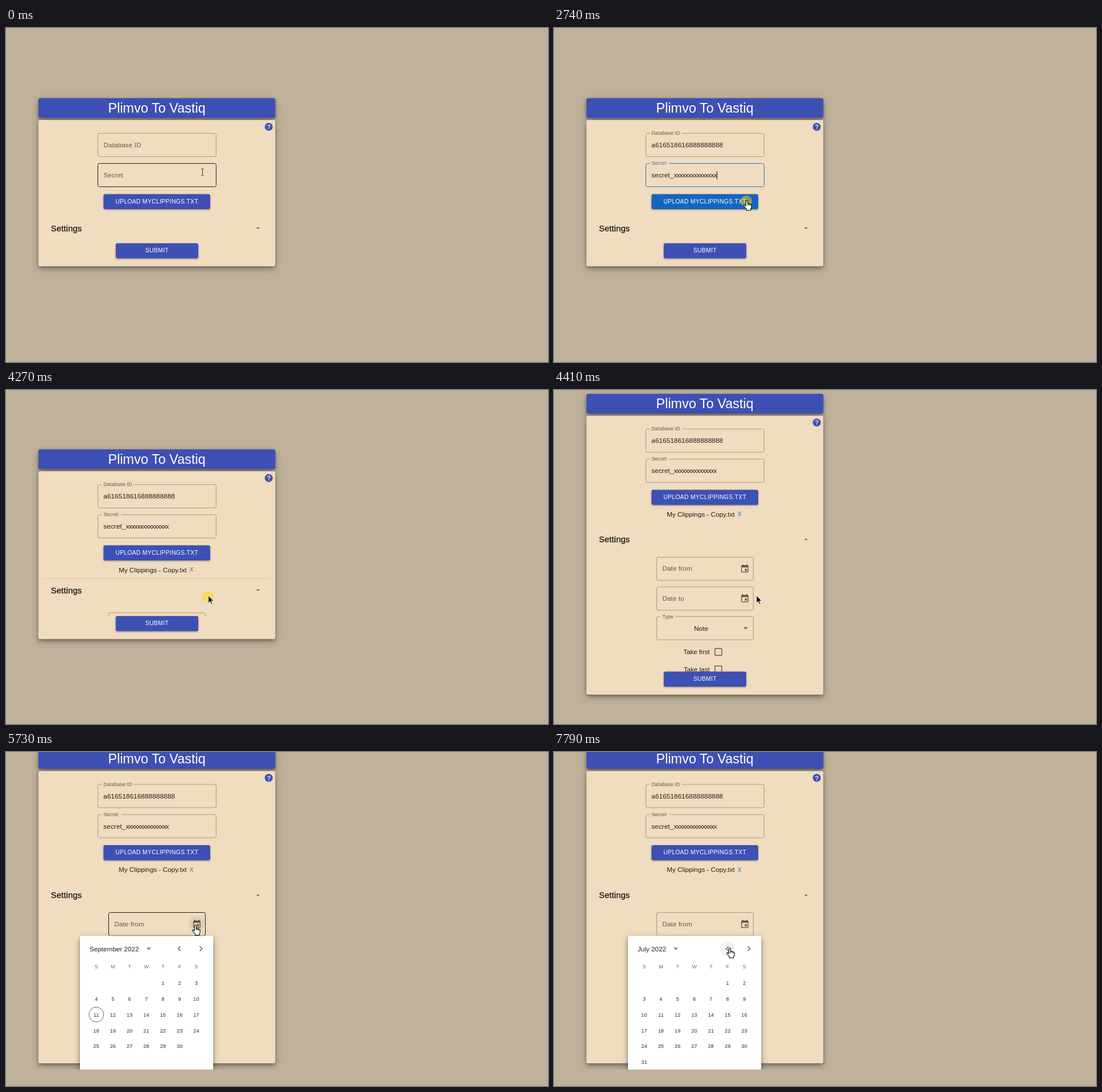
An HTML page for the animation above (8 s loop, 953 by 588 pixels).

```html
<!DOCTYPE html>
<html lang="en">
<head>
<meta charset="utf-8">
<title>Clippings form</title>
<style>
html, body { margin: 0; width: 100%; height: 100%; overflow: hidden; background: #c0b19b; }
svg { display: block; width: 953px; height: 588px; font-family: "Liberation Sans", Arial, sans-serif; }
.paper { filter: drop-shadow(0 2px 2px rgba(0,0,0,.24)) drop-shadow(0 4px 6px rgba(0,0,0,.32)); }
.btn { filter: drop-shadow(0 1px 1.5px rgba(0,0,0,.4)); }
</style>
</head>
<body>
<svg id="stage" viewBox="0 0 953 588"></svg>
<script>
const LOOP = 8000;
const BLUE = '#3e50b4', FOCUS = '#1976d2', HOVER = '#1565c0';
const INK = 'rgba(0,0,0,.87)', GREY = 'rgba(0,0,0,.6)', ICON = 'rgba(0,0,0,.56)', LINE = 'rgba(0,0,0,.3)';
const BASE = 11.73, SMALL = 8.8;

// Moments of the story
const FOCUS_ID = 580, PASTE_ID = 1050, FOCUS_SECRET = 1790, PASTE_SECRET = 2060;
const FILE_AT = 2950, EXPAND = 4222, POPUP = 5300, MONTH_CLICKS = [6950, 7420];
const CLICKS = [FOCUS_ID, FOCUS_SECRET, 2680, 4160, 5220, ...MONTH_CLICKS];

const PATH = [
  [70, 345.5, 254], [320, 470, 211], [560, 308, 210], [1570, 308, 210],
  [1770, 268, 252], [2080, 268, 252], [2360, 339, 303.5], [FILE_AT, 339, 303.5], [3490, 527, 395],
  [3770, 351, 367.5], [4180, 351, 367], [4290, 356, 362], [4480, 356, 362],
  [5080, 333, 305], [5990, 333, 305], [6740, 313, 340], [6900, 312.5, 340.5], [7700, 309, 345]
];
const KINDS = [
  [0, 'beam'], [160, 'arrow'], [430, 'beam'], [2230, 'hand'], [FILE_AT, ''], [3490, 'arrow'],
  [3650, 'hand'], [4240, 'arrow'], [4860, 'hand'], [6260, 'arrow'], [6480, 'hand']
];
const MONTHS = [
  { name: 'September 2022', first: 4, days: 30, tri: 251, today: 11 },
  { name: 'August 2022', first: 1, days: 31, tri: 233 },
  { name: 'July 2022', first: 5, days: 31, tri: 214 }
];

const clamp = v => Math.max(0, Math.min(1, v));
const mix = (a, b, k) => a + (b - a) * k;
const within = (t, a, b) => t >= a && t < b;

function bezier(x1, y1, x2, y2) {
  const at = (a, b, s) => 3 * a * s * (1 - s) ** 2 + 3 * b * s * s * (1 - s) + s ** 3;
  return x => {
    if (x <= 0 || x >= 1) return clamp(x);
    let lo = 0, hi = 1;
    for (let i = 0; i < 22; i++) {
      const mid = (lo + hi) / 2;
      if (at(x1, x2, mid) < x) lo = mid; else hi = mid;
    }
    return at(y1, y2, lo);
  };
}
const standard = bezier(.4, 0, .2, 1);
const slide = bezier(.35, .8, .4, 1);
const glide = bezier(.4, 0, .4, 1);
const ramp = (t, start, length, ease = standard) => ease(clamp((t - start) / length));

const text = (x, y, str, size = BASE, fill = INK, more = '') =>
  `<text x="${x}" y="${y}" font-size="${size}" fill="${fill}" ${more}>${str}</text>`;
const middle = 'text-anchor="middle"';
const spaced = 'letter-spacing=".11"';
const rect = (x, y, w, h, fill, more = '') =>
  `<rect x="${x}" y="${y}" width="${w}" height="${h}" fill="${fill}" ${more}/>`;
const circle = (x, y, r, fill, more = '') =>
  `<circle cx="${x}" cy="${y}" r="${r}" fill="${fill}" ${more}/>`;
const path = (d, more) => `<path d="${d}" ${more}/>`;
const triangle = (x, y, w, up) => {
  const s = up ? -1 : 1;
  return path(`M${x - w / 2} ${y - s * w / 4}h${w}l${-w / 2} ${s * w / 2}z`, `fill="${ICON}"`);
};

function button(x, y, w, label, fill = BLUE) {
  return rect(x, y, w, 26.5, fill, 'rx="3" class="btn"') +
    text(x + w / 2, y + 16.4, label, 10.4, '#fff', `${middle} letter-spacing=".3"`);
}

// Outlined field; k is how far its label has floated into the notch
function field(x, y, w, label, notch, k, color = LINE, labelColor = GREY) {
  const h = 41, r = 3, gap = notch * k;
  const d = `M${x + 7 + gap} ${y}H${x + w - r}a${r} ${r} 0 0 1 ${r} ${r}v${h - 2 * r}a${r} ${r} 0 0 1 ${-r} ${r}` +
    `H${x + r}a${r} ${r} 0 0 1 ${-r} ${-r}v${2 * r - h}a${r} ${r} 0 0 1 ${r} ${-r}h${7 - r}` + (gap ? '' : 'z');
  return path(d, `fill="none" stroke="${color}"`) +
    text(x + 9.9, y + mix(24, 2.8, k), label, mix(BASE, SMALL, k), labelColor, spaced);
}

const caret = (x, y) => rect(x, y - 11, 1, 14, '#111');

function loginFields(t) {
  const idFocus = within(t, FOCUS_ID, FOCUS_SECRET), secretFocus = within(t, FOCUS_SECRET, FILE_AT);
  const border = (focus, hover) => focus ? FOCUS : hover ? '#1a1a1a' : LINE;
  const tint = focus => focus ? '#51709a' : GREY;
  let out = field(161.5, 62, 208, 'Database ID', 55.5, ramp(t, FOCUS_ID, 180),
    border(idFocus, within(t, 430, 1650)), tint(idFocus));
  out += field(161.5, 115, 208, 'Secret', 34, ramp(t, FOCUS_SECRET, 180),
    border(secretFocus, t < 150 || within(t, 1680, 2200)), tint(secretFocus));
  const hasId = t >= PASTE_ID, hasSecret = t >= PASTE_SECRET;
  if (hasId) out += text(171.3, 86.7, 'a616518616' + '8'.repeat(9), BASE, INK, spaced);
  if (hasSecret) {
    out += text(171.3, 139.7, 'secret_', BASE, INK, spaced) +
      text(210.8, 139.7, 'x'.repeat(15), BASE, INK, 'letter-spacing="-.86"');
  }
  if (idFocus) out += caret(hasId ? 297.5 : 171, 86.7);
  if (secretFocus) out += caret(hasSecret ? 286 : 171, 139.7);
  return out;
}

function eventIcon(x, y) {
  return rect(x - 5.8, y - 5.2, 11.6, 11.4, 'none', `rx="1" stroke="${ICON}" stroke-width="1.5"`) +
    rect(x - 5, y - 5, 10, 3, ICON) + rect(x - 4.4, y - 7.6, 1.5, 2, ICON) +
    rect(x + 2.9, y - 7.6, 1.5, 2, ICON) + rect(x, y + .4, 3.7, 3.7, ICON);
}

function details(t) {
  const hot = within(t, 4800, 6240);
  let out = field(180.5, 287.5, 170, 'Date from', 0, 0, hot ? '#1a1a1a' : LINE) +
    field(180.5, 340, 170, 'Date to', 0, 0) + field(180.5, 392.2, 170, 'Type', 26.5, 1);
  if (within(t, 4880, 6220)) out += circle(335.5, 307.5, 14, 'rgba(0,0,0,.06)');
  out += eventIcon(335.5, 307.7) + eventIcon(335.5, 360);
  out += text(258.8, 417, 'Note', BASE, INK, `${middle} ${spaced}`) + triangle(337, 412.8, 7.6);
  ['Take first', 'Take last'].forEach((label, i) => {
    const y = 454.2 + i * 30.8;
    out += text(273.8, y + 4.1, label, 11.6, INK, 'text-anchor="end"') +
      rect(283, y - 6, 12, 12, 'none', `rx="1" stroke="${GREY}" stroke-width="1.5"`);
  });
  return out;
}

function form(t) {
  const open = ramp(t, EXPAND, 297), file = t >= FILE_AT;
  const grow = (file ? 18 : 0) + 239 * open;
  const shift = (file ? 18 : 0) + 9.5 * open;
  const bottom = 255.5 + grow;
  let out = rect(57, 0, 416.5, 34.5, BLUE, 'rx="3" class="paper"') +
    rect(57, 38.5, 416.5, 257.5 + grow, '#f0dcbe', 'rx="3" class="paper"') +
    text(265.2, 25.3, 'Plimvo To Vastiq', 23.47, '#fff', middle) +
    circle(462, 50.5, 7, BLUE) + text(462, 54.5, '?', 11, '#f4e4cc', `${middle} font-weight="bold"`);
  out += loginFields(t);
  out += button(171.5, 169, 187.5, 'UPLOAD MYCLIPPINGS.TXT', within(t, 2240, FILE_AT) ? HOVER : BLUE);
  if (file) {
    out += text(198.2, 216.3, 'My Clippings - Copy.txt') + text(326.2, 215.6, 'X', 10.4, FOCUS, middle) +
      rect(68, 227, 395, 1, `rgba(0,0,0,${.12 * (1 - open)})`);
  }
  out += text(79, 234.3 + shift, 'Settings', 14.8, '#111', 'letter-spacing=".11" stroke="#111" stroke-width=".25"') +
    triangle(443, 229.2 + shift, 6, open > .5);
  if (open > 0) {
    out += `<clipPath id="fold">${rect(57, 262, 417, Math.max(0, bottom - 262), '#000')}</clipPath>` +
      `<g clip-path="url(#fold)">${details(t)}</g>`;
  }
  out += button(193, bottom, 145, 'SUBMIT');
  return `<g transform="translate(0 ${123.5 - grow / 2})">${out}</g>`;
}

const column = i => 158.8 + i * 29.33;

function days(month, dx) {
  let out = '';
  for (let d = 1; d <= month.days; d++) {
    const cell = month.first + d - 1, x = column(cell % 7), y = 406.7 + Math.floor(cell / 7) * 27.87;
    if (d === month.today) out += circle(x, y - .2, 13, 'none', 'stroke="#666"');
    out += text(x, y + 3.2, d, SMALL, INK, `${middle} letter-spacing=".3"`);
  }
  return `<g transform="translate(${dx} 0)">${out}</g>`;
}

const heading = (month, alpha) => `<g opacity="${alpha}">` +
  text(147, 350.6, month.name, BASE) + triangle(month.tri, 346.4, 7.6) + '</g>';

function popup(t) {
  if (t < POPUP) return '';
  const show = ramp(t, POPUP, 270), scale = mix(.75, 1, show);
  const index = MONTH_CLICKS.filter(c => t >= c).length;
  const now = MONTHS[index], old = MONTHS[index - 1];
  const k = index ? ramp(t, MONTH_CLICKS[index - 1], 360, slide) : 1;
  let out = rect(130, 323.5, 234.3, 262, '#fff', 'rx="3" class="paper"');
  if (t > 6480) out += circle(305, 346.2, 13, 'rgba(0,0,0,.05)');
  const chevron = `fill="none" stroke="${ICON}" stroke-width="1.6"`;
  out += path('M307 342l-4.2 4.2 4.2 4.2', chevron) + path('M340.6 342l4.2 4.2-4.2 4.2', chevron);
  if (k < 1) out += heading(old, 1 - k);
  out += heading(now, k);
  [...'SMTWTFS'].forEach((d, i) => out += text(column(i), 380.7, d, SMALL, GREY, middle));
  out += '<g clip-path="url(#grid)">' + (k < 1 ? days(old, 234 * k) : '') + days(now, -234 * (1 - k)) + '</g>';
  return `<g opacity="${show}" transform="translate(247 323.5) scale(${scale} ${scale * scale}) ` +
    `translate(-247 -323.5)">${out}</g>`;
}

const SHAPES = {
  beam: path('M-2.5-6H-.7L0-5.4.7-6H2.5M-2.5 6H-.7L0 5.4.7 6H2.5M0-5.4V5.4',
    'fill="none" stroke="#fff" stroke-width="2.4" opacity=".5"') +
    path('M-2.5-6H-.7L0-5.4.7-6H2.5M-2.5 6H-.7L0 5.4.7 6H2.5M0-5.4V5.4', 'fill="none" stroke="#222"'),
  arrow: path('M0 0V13L3 10.2 5.2 15.2 7.2 14.3 5 9.5H9.2Z', 'fill="#000" stroke="#fff" stroke-width=".8"'),
  hand: path('M-1.5 10V1.5a1.5 1.5 0 0 1 3 0V6q1.5-1 2.5.6 1.6-.6 2.3.8 1.9-.4 1.9 1.6V12q0 2-1.5 3.5V17.5H-.5' +
    'V15.5L-5 10q-.8-1.7.8-2 1.2 0 2.7 2z', 'fill="#fff" stroke="#000" stroke-width="1.1" stroke-linejoin="round"') +
    path('M1.5 6V9M4 6.8V9.3M6.2 7.6V9.6', 'stroke="#000" stroke-width=".8"')
};

function pointer(t) {
  const kind = KINDS.filter(k => t >= k[0]).pop()[1];
  if (!kind) return '';
  const next = PATH.findIndex(p => p[0] > t);
  const b = next < 0 ? PATH[PATH.length - 1] : PATH[next];
  const a = next > 0 ? PATH[next - 1] : b;
  const k = a === b ? 0 : glide((t - a[0]) / (b[0] - a[0]));
  const pressed = CLICKS.some(c => within(t, c, c + 170));
  return `<g transform="translate(${mix(a[1], b[1], k)} ${mix(a[2], b[2], k)})">` +
    (pressed ? circle(-.8, 1.5, 10, 'rgba(250,215,0,.5)') : '') + SHAPES[kind] + '</g>';
}

const stage = document.getElementById('stage');
const DEFS = `<clipPath id="page">${rect(0, 0, 953, 559, '#000')}</clipPath>` +
  `<clipPath id="grid">${rect(130, 388, 234, 180, '#000')}</clipPath>`;

function draw(t) {
  stage.innerHTML = DEFS + rect(0, 0, 953, 588, '#c0b19b') +
    `<g clip-path="url(#page)">${form(t)}${popup(t)}</g>${pointer(t)}`;
}

function tick() {
  draw(performance.now() % LOOP);
  requestAnimationFrame(tick);
}
tick();
</script>
</body>
</html>
```
